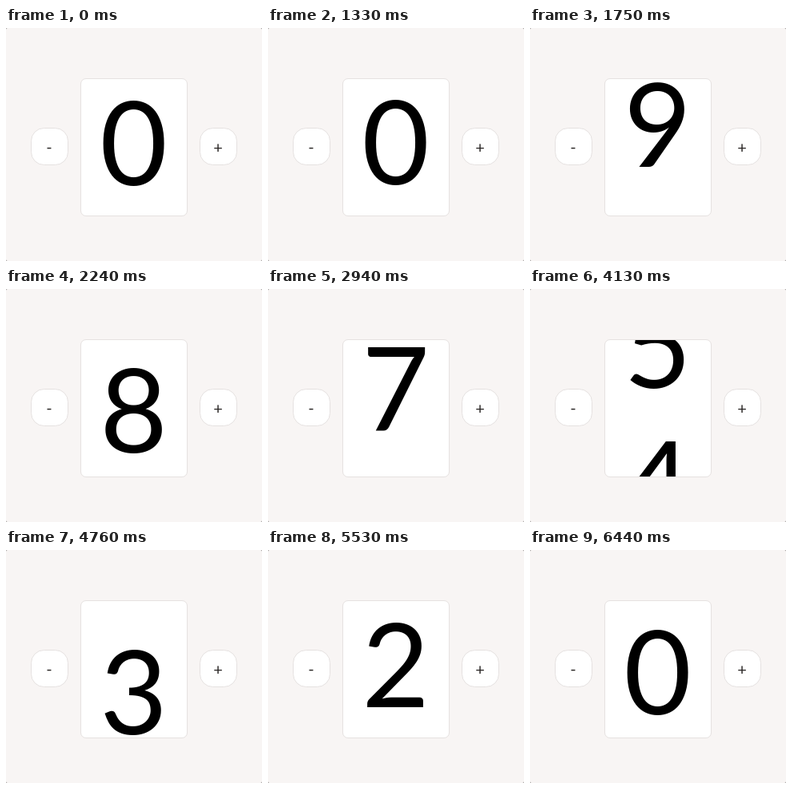
An HTML page that plays this animation: 320 px wide and 292 px high, repeating every 6510 ms.

```html
<!DOCTYPE html>
<html lang="en">
<head>
<meta charset="utf-8">
<title>Rolling counter</title>
<style>
html, body { margin: 0; width: 100%; height: 100%; overflow: hidden; background: #8a8887; }
svg { display: block; width: 320px; height: 292px; }
text { font-family: Lato, "Open Sans", sans-serif; text-anchor: middle; }
.card { fill: #fff; stroke: #e5e1e0; }
.sign { font-size: 20px; fill: #292524; }
.digit { font-size: 146px; fill: #000; }
</style>
</head>
<body>
<svg viewBox="0 0 320 292">
  <clipPath id="window"><rect x="94" y="64" width="132" height="171" rx="6"/></clipPath>
  <rect width="320" height="292" rx="2" fill="#f8f5f4"/>
  <rect class="card" x="31.5" y="125.5" width="46" height="46" rx="16"/>
  <text class="sign" x="54" y="156">-</text>
  <rect class="card" x="242.5" y="125.5" width="46" height="46" rx="16"/>
  <text class="sign" x="265" y="157">+</text>
  <rect class="card" x="93.5" y="63.5" width="133" height="172" rx="6.5"/>
  <g clip-path="url(#window)">
    <text class="digit" id="upper" x="159.7"></text>
    <text class="digit" id="lower" x="159.7"></text>
  </g>
</svg>
<script>
const LOOP = 6510, TICK = 70, PITCH = 171, BASELINE = 197;
// Moments at which the minus button is pressed
const presses = [1320, 2011, 2493, 2971, 3450, 4010, 4565, 5288, 5752, 6209];
const upper = document.getElementById('upper');
const lower = document.getElementById('lower');

// Step response of a spring: stiffness 100, damping 10, mass 1
function spring(ms) {
  if (ms <= 0) return 0;
  const s = ms / 1000, w = Math.sqrt(75);
  return 1 - Math.exp(-5 * s) * (Math.cos(w * s) + 5 / w * Math.sin(w * s));
}

function place(el, index, travel) {
  el.textContent = (20 - index) % 10;
  el.setAttribute('y', BASELINE + (index - travel) * PITCH);
}

function draw(now) {
  const t = Math.floor(now % LOOP / TICK) * TICK;
  const travel = presses.reduce((sum, p) => sum + spring(t - p), 0);
  const index = Math.floor(travel);
  place(upper, index, travel);
  place(lower, index + 1, travel);
}

const start = performance.now();
function loop() {
  draw(performance.now() - start);
  requestAnimationFrame(loop);
}
loop();
</script>
</body>
</html>
```
